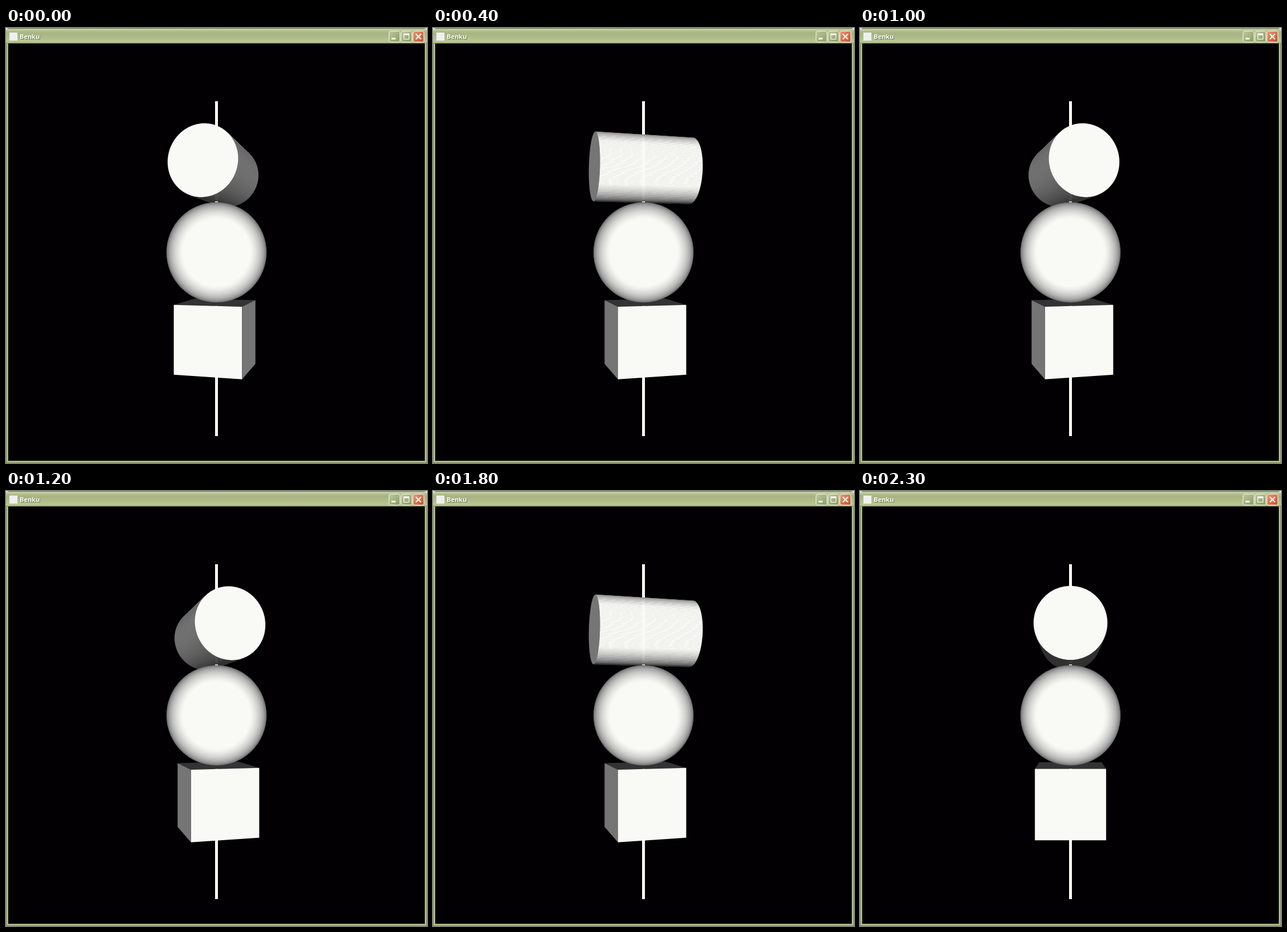
These frames come from a looping animation (737x760 px, 2.4 s). An HTML page with a canvas:

```html
<!DOCTYPE html>
<html lang="en">
<head>
<meta charset="utf-8">
<title>Benku</title>
<style>
  html, body { margin: 0; width: 100%; height: 100%; overflow: hidden; background: #020003; }
  canvas, svg { position: absolute; left: 0; top: 0; width: 737px; height: 760px; display: block; }
  text { font: bold 11px "Noto Sans", "Open Sans", sans-serif; }
</style>
</head>
<body>
<canvas id="scene" width="737" height="760"></canvas>
<svg viewBox="0 0 737 760">
  <defs>
    <linearGradient id="bar" x1="0" y1="0" x2="0" y2="1">
      <stop offset="0" stop-color="#75875a"/>
      <stop offset=".05" stop-color="#8c9c6c"/>
      <stop offset=".09" stop-color="#d3dcb4"/>
      <stop offset=".17" stop-color="#b3c08f"/>
      <stop offset=".35" stop-color="#a6b482"/>
      <stop offset=".7" stop-color="#b2bf8c"/>
      <stop offset=".9" stop-color="#bcc996"/>
      <stop offset=".95" stop-color="#a3b17c"/>
      <stop offset="1" stop-color="#7d8d5c"/>
    </linearGradient>
    <linearGradient id="olive" x1="0" y1="0" x2="1" y2="1">
      <stop offset="0" stop-color="#bdca9d"/>
      <stop offset="1" stop-color="#8b9d66"/>
    </linearGradient>
    <linearGradient id="red" x1="0" y1="0" x2="1" y2="1">
      <stop offset="0" stop-color="#ea9a7b"/>
      <stop offset="1" stop-color="#c4502c"/>
    </linearGradient>
  </defs>

  <!-- window frame -->
  <g shape-rendering="crispEdges">
    <path d="M0 20H4V756H734V20H737V760H0Z" fill="#b3c08d"/>
    <path d="M0 20H1V759H736V20H737V760H0Z" fill="#76865a"/>
    <path d="M3 27H4V756H733V27H734V757H3Z" fill="#8f9f6b"/>
  </g>
  <rect width="737" height="27" fill="url(#bar)"/>
  <path d="M0 0H5Q1 1 0 5ZM737 0H732Q736 1 737 5Z" fill="#e6e9dc"/>

  <rect x="6" y="8" width="14" height="14" fill="#eef0f0"/>
  <text x="25" y="20" fill="#5c6b43">Benku</text>
  <text x="24" y="19" fill="#fff">Benku</text>

  <!-- window buttons -->
  <g stroke="#f3f6e8">
    <rect x="670.5" y="5.5" width="19" height="19" rx="3" fill="url(#olive)"/>
    <rect x="691.5" y="5.5" width="19" height="19" rx="3" fill="url(#olive)"/>
    <rect x="712.5" y="5.5" width="19" height="19" rx="3" fill="url(#red)"/>
  </g>
  <g fill="none" stroke="#fff">
    <path d="M675 18.5H682" stroke-width="3"/>
    <path d="M696.5 11V19.5H705.5V11"/>
    <path d="M696 11H706" stroke-width="3"/>
    <path d="M717.5 10.5L726.5 19.5M726.5 10.5L717.5 19.5" stroke-width="2"/>
  </g>
</svg>

<script>
const ctx = document.getElementById("scene").getContext("2d");
const CX = 368.5, CY = 392;       // centre of the view
const FOCAL = 881, DIST = 15.13;  // camera, in units of half a cube
const STEP = 100, TURN = 12;      // ms per pose, poses per half turn
const BALL = 1.5, HALF = 1.5;     // ball radius, half length of the cylinder
const MID = 2.5;                  // height of cylinder and cube centres
const CREAM = "#fffcf3";
const start = performance.now();

// ambient light plus a headlight
function shade(nz) {
  const v = Math.round(Math.min(249, 51 + 255 * Math.max(0, nz)));
  return v > 190 ? `rgb(${v},${v + 1},${v - 4})` : `rgb(${v},${v},${v})`;
}

function spin([x, y, z], a) {
  const c = Math.cos(a), s = Math.sin(a);
  return [x * c - z * s, y, x * s + z * c];
}

function project([x, y, z]) {
  const k = FOCAL / (DIST - z);
  return [CX + x * k, CY + y * k];
}

// draws a flat face if its normal points at the camera
function face(points, normal, a, seam = 0) {
  const n = spin(normal, a);
  const pts = points.map(p => spin(p, a));
  const [x, y, z] = pts[0];
  if (n[2] * (DIST - z) - n[0] * x - n[1] * y <= 0) return;
  ctx.beginPath();
  pts.forEach(p => ctx.lineTo(...project(p)));
  ctx.closePath();
  ctx.fillStyle = ctx.strokeStyle = shade(n[2]);
  ctx.fill();
  if (seam) {
    ctx.lineWidth = seam;
    ctx.stroke();
  }
}

function cylinder(a) {
  const count = 180;
  const rim = (i, z) => {
    const t = i / count * 2 * Math.PI;
    return [Math.cos(t), Math.sin(t) - MID, z];
  };
  for (let i = 0; i < count; i++) {
    const t = (i + .5) / count * 2 * Math.PI;
    face([rim(i, -HALF), rim(i + 1, -HALF), rim(i + 1, HALF), rim(i, HALF)],
      [Math.cos(t), Math.sin(t), 0], a, .6);
  }
  for (const side of [-1, 1]) {
    const cap = Array.from({ length: count }, (_, i) => rim(i, side * HALF));
    face(cap, [0, 0, side], a);
  }
}

function cube(a) {
  const top = MID - 1, low = MID + 1;
  face([[-1, top, -1], [1, top, -1], [1, top, 1], [-1, top, 1]], [0, -1, 0], a);
  for (let i = 0; i < 4; i++) {
    face([[-1, top, 1], [1, top, 1], [1, low, 1], [-1, low, 1]],
      [0, 0, 1], a + i * Math.PI / 2);
  }
}

function ball() {
  const edge = Math.acos(BALL / DIST);
  const reach = t => FOCAL * BALL * Math.sin(t) / (DIST - BALL * Math.cos(t));
  const radius = reach(edge);
  const glow = ctx.createRadialGradient(CX, CY, 0, CX, CY, radius);
  for (let i = 0; i <= 40; i++) {
    const t = edge * i / 40;
    glow.addColorStop(Math.min(1, reach(t) / radius), shade(Math.cos(t)));
  }
  ctx.fillStyle = glow;
  ctx.beginPath();
  ctx.arc(CX, CY, radius, 0, 2 * Math.PI);
  ctx.fill();
}

function bar(y, height) {
  ctx.fillStyle = CREAM;
  ctx.fillRect(366, y, 5, height);
}

function draw(pose) {
  const turn = pose < TURN ? pose + 1 : 2 * TURN - 1 - pose;
  const a = turn * Math.PI / TURN;
  ctx.fillStyle = "#020003";
  ctx.fillRect(0, 0, 737, 760);
  bar(128, 585);
  cylinder(a);
  bar(303, 3);
  cube(a);
  ball();
}

let shown = -1;
function tick() {
  const time = Math.max(0, performance.now() - start);
  const pose = Math.floor(time / STEP) % (2 * TURN);
  if (pose !== shown) draw(shown = pose);
  requestAnimationFrame(tick);
}
tick();
</script>
</body>
</html>
```
